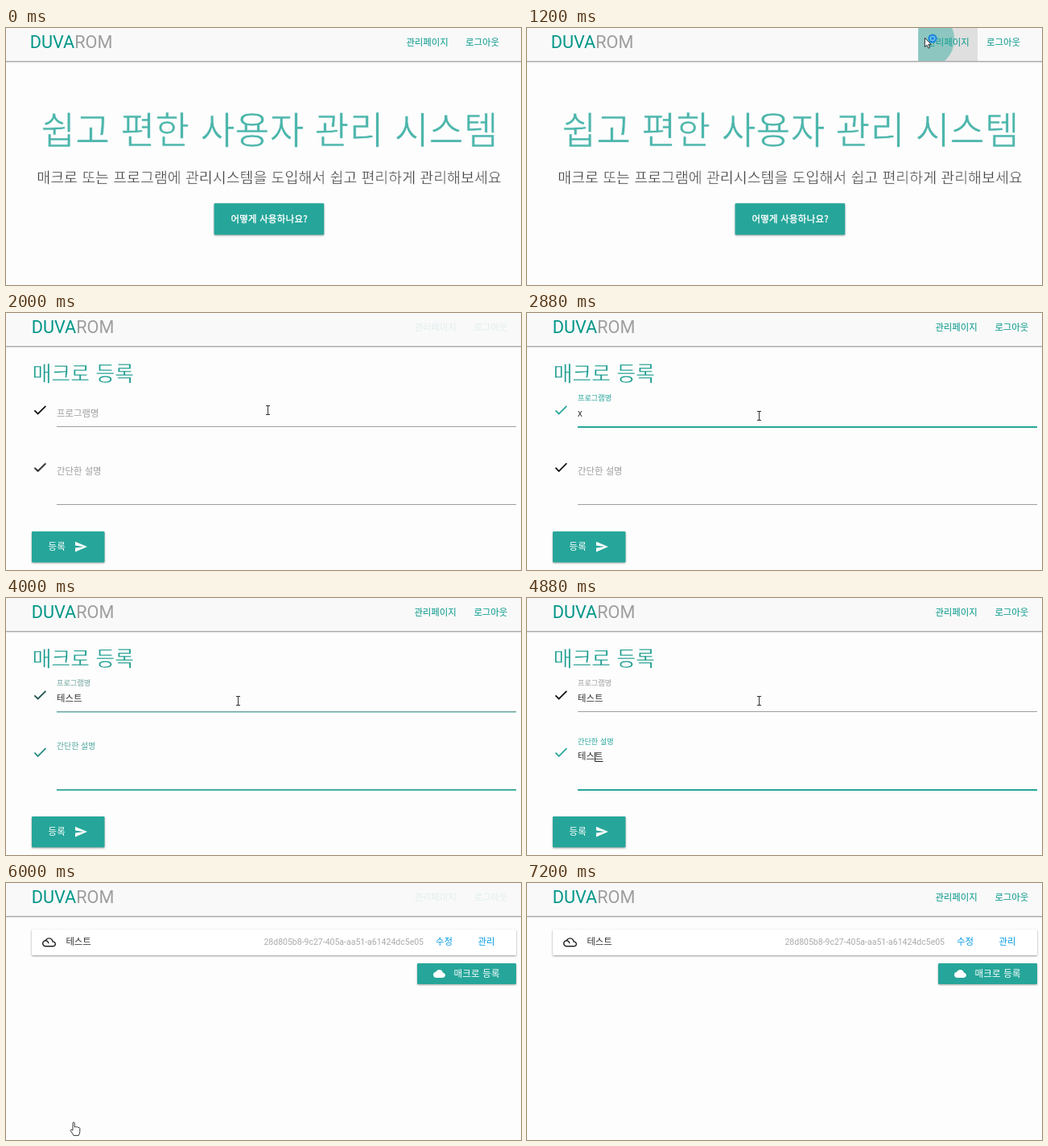
An HTML page that plays this animation: 640 by 320 pixels, repeating every 7920 ms.

```html
<!DOCTYPE html>
<html lang="ko">
<head>
<meta charset="utf-8">
<title>쉽고 편한 사용자 관리 시스템</title>
<style>
  html, body { margin: 0; width: 100%; height: 100%; overflow: hidden; background: #fdfdfd; }
  svg { display: block; width: 640px; height: 320px; }
  text { font: 11.4px 'Noto Sans CJK KR', 'Noto Sans CJK', sans-serif; fill: #333; white-space: pre; }
  .mid { text-anchor: middle; }
  .end { text-anchor: end; }
  .teal { fill: #009688; }
  .logo { font: 21.7px Roboto, sans-serif; fill: #009688; }
  .logo tspan { fill: #9e9e9e; }
  /* A background-coloured outline thins the strokes to a light weight */
  .thin { stroke: #fdfdfd; stroke-width: .4px; }
  .hero { font-size: 46.75px; fill: #4db6ac; stroke-width: .7px; }
  .lead { font-size: 18.4px; fill: #444; }
  .title { font-size: 25.9px; fill: #159a8d; }
  .btn { fill: #26a69a; filter: drop-shadow(0 1px 1px rgba(0, 0, 0, .35)); }
  .cap { fill: #fff; letter-spacing: .3px; }
  .strong { stroke: #fff; stroke-width: .35px; }
  .card { fill: #fff; filter: drop-shadow(0 1px 1px rgba(0, 0, 0, .4)); }
  .uuid { font: 10.5px Roboto, sans-serif; fill: #aaa; }
  .act { fill: #039be5; }
  .rule { stroke: #9e9e9e; }
  .mark { fill: none; stroke: #222; }

  /* One loop is 99 ticks of 80 ms, so tick n sits at n.n% */
  .a { animation: 7.92s step-end infinite; }
  #home { animation-name: home; }
  #form { animation-name: form; }
  #list { animation-name: list; }
  #links { animation-name: links; }
  #hover { animation-name: hover; }
  #wave { animation-name: wave; }
  #press { animation-name: press; }
  #over { animation-name: over; }
  #line1 { animation-name: line1; }
  #line2 { animation-name: line2; }
  #check1 { animation-name: check1; }
  #check2 { animation-name: check2; }
  #label1 { animation-name: label1; }
  #label2 { animation-name: label2; }
  #mouse { animation-name: mouse; }
  #arrow { animation-name: arrow; }
  #busy { animation-name: busy; }
  #hand { animation-name: hand; }
  #beam { animation-name: beam; }

  @keyframes home { 0% { opacity: 1 } 22.22%, 100% { opacity: 0 } }
  @keyframes form { 0% { opacity: 0 } 24.24% { opacity: 1 } 73.73%, 100% { opacity: 0 } }
  @keyframes list { 0% { opacity: 0 } 74.74%, 100% { opacity: 1 } }
  @keyframes links {
    0% { opacity: 0 }
    24.24% { opacity: 0; animation-timing-function: steps(10) }
    34.34% { opacity: 1 }
    73.73% { opacity: 0 }
    74.74% { opacity: 0; animation-timing-function: steps(10) }
    84.84%, 100% { opacity: 1 }
  }
  @keyframes hover {
    0% { opacity: 0 }
    11.11% { opacity: 0; animation-timing-function: ease }
    14.14%, 100% { opacity: 1 }
  }
  @keyframes wave {
    0% { transform: scale(0); opacity: .45 }
    14.14% { transform: scale(0); opacity: .45; animation-timing-function: ease-out }
    20.2% { transform: scale(1); opacity: .45; animation-timing-function: linear }
    22.22%, 100% { transform: scale(1); opacity: 0 }
  }
  @keyframes press {
    0% { transform: scale(0) }
    70.7% { transform: scale(0); animation-timing-function: ease-out }
    74.74%, 100% { transform: scale(1) }
  }
  @keyframes over { 0% { fill: #26a69a } 69.69%, 100% { fill: #2bbbad } }
  @keyframes line1 {
    0% { opacity: 0 }
    29.29% { opacity: 0; animation-timing-function: ease }
    32.32% { opacity: 1 }
    49.49% { opacity: 1; animation-timing-function: ease }
    52.52%, 100% { opacity: 0 }
  }
  @keyframes line2 {
    0% { opacity: 0 }
    48.48% { opacity: 0; animation-timing-function: ease }
    52.52%, 100% { opacity: 1 }
  }
  @keyframes check1 {
    0% { fill: #111 }
    29.29% { fill: #111; animation-timing-function: ease }
    32.32% { fill: #26a69a }
    49.49% { fill: #26a69a; animation-timing-function: ease }
    52.52%, 100% { fill: #111 }
  }
  @keyframes check2 {
    0% { fill: #111 }
    48.48% { fill: #111; animation-timing-function: ease }
    52.52%, 100% { fill: #26a69a }
  }
  @keyframes label1 {
    0% { transform: translate(63px, 128.8px); fill: #9e9e9e }
    29.29% { transform: translate(63px, 128.8px); fill: #9e9e9e; animation-timing-function: ease-out }
    32.32% { transform: translate(63px, 109px) scale(.805); fill: #26a69a }
    49.49% { transform: translate(63px, 109px) scale(.805); fill: #26a69a; animation-timing-function: ease }
    52.52%, 100% { transform: translate(63px, 109px) scale(.805); fill: #9e9e9e }
  }
  @keyframes label2 {
    0% { transform: translate(63px, 200.8px); fill: #9e9e9e }
    48.48% { transform: translate(63px, 200.8px); fill: #9e9e9e; animation-timing-function: ease-out }
    52.52%, 100% { transform: translate(63px, 182px) scale(.805); fill: #26a69a }
  }
  @keyframes mouse {
    0% { transform: translate(257px, 2px); opacity: 0 }
    4.04% { transform: translate(257px, 2px); opacity: 1; animation-timing-function: steps(7) }
    11.11% { transform: translate(494px, 12px); opacity: 1 }
    19.19% { transform: translate(494px, 12px); opacity: 1; animation-timing-function: steps(6) }
    25.25% { transform: translate(325px, 121px); opacity: 1; animation-timing-function: steps(4) }
    29.29% { transform: translate(288px, 128px); opacity: 1 }
    66.66% { transform: translate(288px, 128px); opacity: 1; animation-timing-function: steps(4) }
    70.7% { transform: translate(84px, 297px); opacity: 1 }
    89.89% { transform: translate(11px, 281px); opacity: 1 }
    90.9%, 100% { transform: translate(11px, 281px); opacity: 0 }
  }
  @keyframes arrow {
    0% { opacity: 1 } 11.11% { opacity: 0 } 14.14% { opacity: 1 }
    24.24% { opacity: 0 } 89.89%, 100% { opacity: 1 }
  }
  @keyframes busy { 0% { opacity: 0 } 14.14% { opacity: 1 } 24.24%, 100% { opacity: 0 } }
  @keyframes hand {
    0% { opacity: 0 } 11.11% { opacity: 1 } 14.14% { opacity: 0 }
    69.69% { opacity: 1 } 89.89%, 100% { opacity: 0 }
  }
  @keyframes beam { 0% { opacity: 0 } 24.24% { opacity: 1 } 69.69%, 100% { opacity: 0 } }
</style>
</head>
<body>
<svg viewBox="0 0 640 320">
  <defs>
    <path id="check" d="M9 16.17L4.83 12l-1.42 1.41L9 19 21 7l-1.41-1.41z"/>
    <path id="cloud" d="M19.35 10.04C18.67 6.59 15.64 4 12 4 9.11 4 6.6 5.64 5.35 8.04 2.34 8.36 0 10.91 0 14c0 3.31 2.69 6 6 6h13c2.76 0 5-2.24 5-5 0-2.64-2.05-4.78-4.65-4.96z"/>
    <clipPath id="tab"><path d="M486.5 0H560v41h-73.5z"/></clipPath>
    <clipPath id="face"><rect x="32" y="272" width="90.5" height="38.5" rx="1.3"/></clipPath>
  </defs>

  <path fill="#fdfdfd" d="M0 0h640v320H0z"/>
  <path fill="#f9f9f9" d="M0 0h640v41H0z"/>
  <path fill="#a6a6a6" d="M0 41h640v1H0z"/>
  <path fill="#dedede" d="M0 42h640v1H0z"/>
  <path fill="#f5f5f5" d="M0 43h640v1H0z"/>

  <g id="home" class="a">
    <text class="logo" x="29.7" y="25">DUVA<tspan>ROM</tspan></text>
    <path id="hover" class="a" d="M486.5 0H560v41h-73.5z" fill-opacity=".1"/>
    <text class="teal" x="497.4" y="22.3">관리페이지</text>
    <text class="teal" x="571" y="22.3">로그아웃</text>
    <g clip-path="url(#tab)"><g transform="translate(495 14)">
      <circle id="wave" class="a" r="137" fill="#26a69a"/>
    </g></g>
    <text class="thin hero mid" x="327.4" y="143.5">쉽고 편한 사용자 관리 시스템</text>
    <text class="thin lead mid" x="327" y="193.2">매크로 또는 프로그램에 관리시스템을 도입해서 쉽고 편리하게 관리해보세요</text>
    <rect class="btn" x="258.6" y="218.2" width="136.6" height="39.4" rx="1.3"/>
    <text class="cap strong mid" x="327.2" y="241.5">어떻게 사용하나요?</text>
  </g>

  <g id="links" class="a">
    <text class="teal" x="507.4" y="22.3">관리페이지</text>
    <text class="teal" x="581.4" y="22.3">로그아웃</text>
  </g>

  <g id="form" class="a">
    <text class="logo" x="31.7" y="25">DUVA<tspan>ROM</tspan></text>
    <text class="thin title" x="32.7" y="85.2">매크로 등록</text>

    <g transform="translate(31.9 110.4) scale(.86)"><use id="check1" class="a" href="#check"/></g>
    <path class="rule" d="M63 141.5H634"/>
    <path id="line1" class="a" d="M63 141h571v2H63z" fill="#26a69a"/>
    <text id="label1" class="a">프로그램명</text>
    <g class="field" transform="translate(63 129.2)"><text/><path class="mark" d="M.5 -9V2.5H10.5"/></g>

    <g transform="translate(31.9 181.8) scale(.86)"><use id="check2" class="a" href="#check"/></g>
    <path class="rule" d="M63 238.5H634"/>
    <path id="line2" class="a" d="M63 238h571v2H63z" fill="#26a69a"/>
    <text id="label2" class="a">간단한 설명</text>
    <g class="field" transform="translate(63 201)"><text/><path class="mark" d="M.5 -9V2.5H10.5"/></g>

    <g class="btn"><rect id="over" class="a" x="32" y="272" width="90.5" height="38.5" rx="1.3"/></g>
    <g clip-path="url(#face)"><g transform="translate(84 298)">
      <circle id="press" class="a" r="80" fill="#fff" fill-opacity=".3"/>
    </g></g>
    <text class="cap" x="52.6" y="295.2">등록</text>
    <path fill="#fff" transform="translate(84.6 282.5) scale(.71)" d="M2.01 21L23 12 2.01 3 2 10l15 2-15 2z"/>
  </g>

  <g id="list" class="a">
    <text class="logo" x="31.7" y="25">DUVA<tspan>ROM</tspan></text>
    <rect class="card" x="32" y="58" width="602" height="32" rx="1"/>
    <g transform="translate(45 65.3) scale(.71)">
      <use href="#cloud" fill="#222"/>
      <path fill="#fff" d="M19 18H6c-2.21 0-4-1.79-4-4s1.79-4 4-4 4 1.79 4 4h2c0-2.76-1.86-5.08-4.4-5.78C8.61 6.88 10.2 6 12 6c3.03 0 5.5 2.47 5.5 5.5v.5H19c1.65 0 3 1.35 3 3s-1.35 3-3 3z"/>
    </g>
    <text x="74.4" y="77.2">테스트</text>
    <text class="uuid end" x="519" y="77">28d805b8-9c27-405a-aa51-a61424dc5e05</text>
    <text class="act" x="534" y="77.2">수정</text>
    <text class="act" x="586.6" y="77.2">관리</text>
    <rect class="btn" x="511" y="100" width="123" height="26" rx="1.3"/>
    <use href="#cloud" transform="translate(531 105.5) scale(.62)" fill="#fff"/>
    <text class="cap" x="556.5" y="117.2">매크로 등록</text>
  </g>

  <g id="mouse" class="a">
    <g id="arrow" class="a">
      <path fill="#fff" stroke="#222" stroke-width=".9" d="M.4 .4V11.5L3 9.2 4.8 13.2 6.6 12.4 4.9 8.6H8.4z"/>
    </g>
    <g id="busy" class="a">
      <circle cx="10" cy="1" r="5.6" fill="#1e88d8"/>
      <circle cx="10" cy="1" r="2.6" fill="none" stroke="#7cc4f2" stroke-width="1.4"/>
    </g>
    <path id="hand" class="a" fill="#fff" stroke="#222" stroke-width=".9" stroke-linejoin="round"
      d="M-1 10V1.6Q0 -.2 1.2 1.6V7Q2.4 5.6 3.6 7 4.8 6 5.8 7.6 7.2 6.8 7.8 8.6V12.4Q7.6 15 6.2 17.4H0Q-1.6 14.4 -3.8 11.4 -3.6 9 -1 10.8z"/>
    <path id="beam" class="a" fill="none" stroke="#333" d="M-2 -5.5H3M-2 5.5H3M.5 -5.5V5.5"/>
  </g>
</svg>
<script>
  const LOOP = 7920, GLYPH = 10.5;
  const fields = [...document.querySelectorAll('.field')].map(g => ({
    text: g.querySelector('text'), mark: g.querySelector('.mark')
  }));
  const typing = [
    { blur: 3920, keys: [[2800, 'x'], [3040, ''], [3200, 'ㅌ'], [3360, '테'], [3440, '텟'], [3520, '테스'], [3600, '테스트']] },
    { blur: 5600, keys: ['ㅌ', '테', '텟', '테스', '테슽', '테스트'].map((s, i) => [4480 + i * 80, s]) }
  ];

  function show({ text, mark }, { blur, keys }, t) {
    const typed = keys.reduce((now, [at, s]) => t >= at ? s : now, '');
    const composing = t < blur && typed && typed !== 'x';
    if (text.textContent !== typed) text.textContent = typed;
    mark.setAttribute('visibility', composing ? 'visible' : 'hidden');
    mark.setAttribute('transform', `translate(${Math.max(0, typed.length - 1) * GLYPH} 0)`);
  }

  let start;
  function tick(now) {
    start ??= now;
    const t = (now - start) % LOOP;
    fields.forEach((f, i) => show(f, typing[i], t));
    requestAnimationFrame(tick);
  }
  requestAnimationFrame(tick);
</script>
</body>
</html>
```
